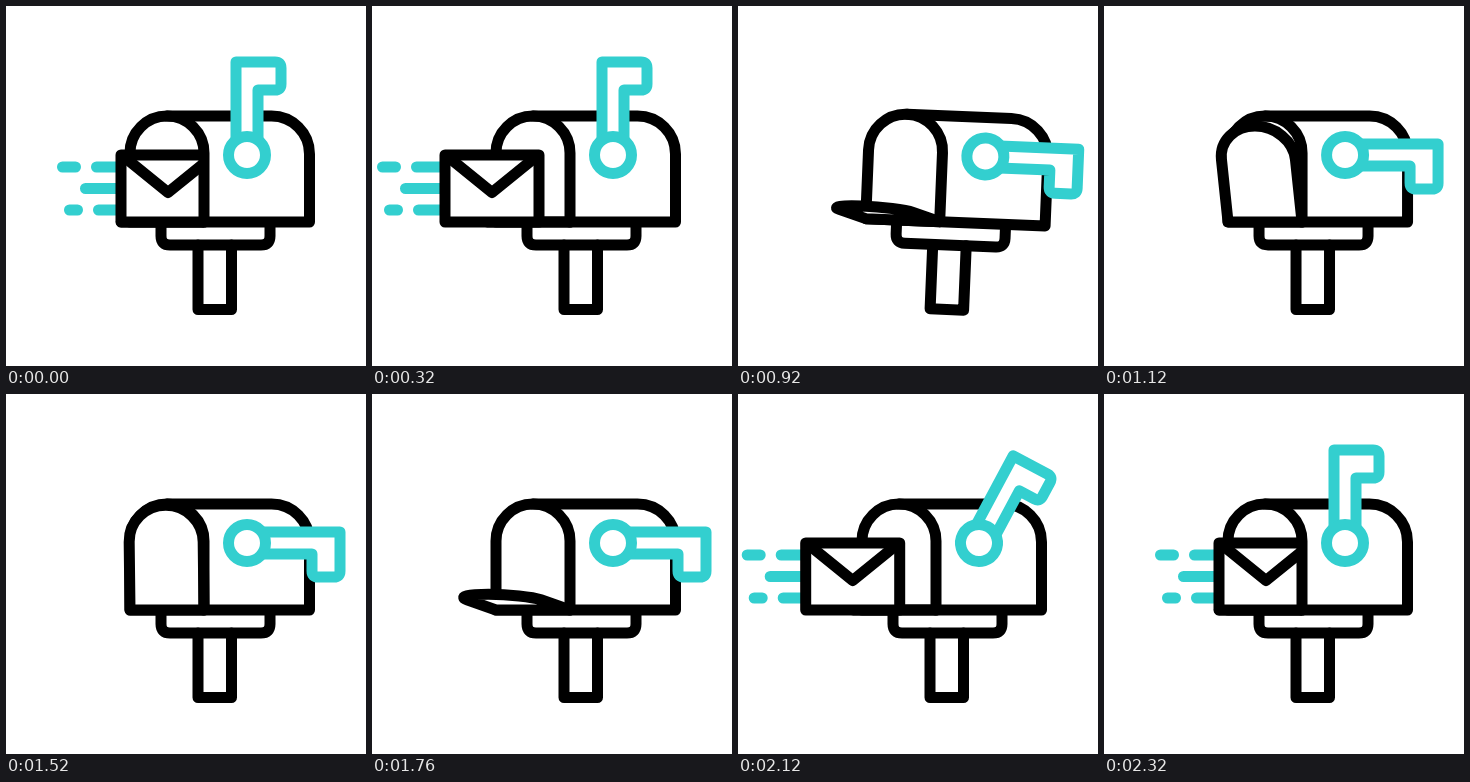
Write an HTML page with a canvas that moves like this. It is 360 px wide and 360 px high and loops after 2400 ms.

```html
<!DOCTYPE html>
<html lang="en">
<head>
<meta charset="utf-8">
<title>Mailbox</title>
<style>
  html, body { margin: 0; width: 100%; height: 100%; overflow: hidden; background: #fff; }
  canvas { display: block; width: 360px; height: 360px; }
</style>
</head>
<body>
<canvas id="stage" width="360" height="360"></canvas>
<script>
const ctx = document.getElementById('stage').getContext('2d');
const LOOP = 2400, BLACK = '#000', TEAL = '#33cfcf';
const HINGE = 216, MOUTH_RIGHT = 198;

const outlines = {
  post: new Path2D('M192 239V303.5H225.5V239'),
  tray: new Path2D('M155 216V230Q155 239 164 239H255Q264 239 264 230V216'),
  box: new Path2D('M161 110H265.5A38 38 0 0 1 303.5 148V216H124V147A37 37 0 0 1 161 110Z'),
  arch: new Path2D('M124 216V147A37 37 0 0 1 198 147V216'),
  mouthEdge: new Path2D('M161 110A37 37 0 0 1 198 147V216'),
  envelope: new Path2D('M0 149H94V216H0Z'),
  fold: new Path2D('M2 150L47 186.5L92 150'),
  flag: new Path2D('M-11 -14V-93H28Q34 -93 34 -87V-71Q34 -65 28 -65H11V-14'),
  ring: new Path2D('M18.5 0A18.5 18.5 0 1 1 -18.5 0A18.5 18.5 0 1 1 18.5 0Z'),
  dashes: new Path2D('M5.5 161H18.5M39.5 161H63.5M28.5 182.5H65.5M12.5 204H20.5M41.5 204H64.5')
};

const ramp = (t, from, to) => Math.min(1, Math.max(0, (t - from) / (to - from)));
const ease = (t, from, to) => { const u = ramp(t, from, to); return u * u * (3 - 2 * u); };
const mix = (a, b, p) => a + (b - a) * p;

function draw(path, color = BLACK, filled = false) {
  if (filled) { ctx.fillStyle = '#fff'; ctx.fill(path); }
  ctx.strokeStyle = color;
  ctx.stroke(path);
}

function group(x, y, angle, paint) {
  ctx.save();
  ctx.translate(x, y);
  ctx.rotate(angle * Math.PI / 180);
  paint();
  ctx.restore();
}

// The door folds up from its hinge, leaning left on the way.
function drawDoor(closed) {
  const height = 0.001 + 0.999 * closed ** 1.5;
  const lean = (13 * (1 - closed) + 46 * Math.sin(Math.PI * closed)) / 106;
  const door = new Path2D();
  door.addPath(outlines.arch, new DOMMatrix([1, 0, lean, height, -lean * HINGE, HINGE * (1 - height)]));
  door.closePath();
  draw(door, BLACK, true);
}

function mailPosition(t) {
  if (t < 320) {
    const p = ease(t, 0, 320);
    return { letter: mix(115, 73, p), trail: mix(51, 5, p) };
  }
  if (t < 1600) {
    const p = ((t - 320) / 280) ** 2;
    return { letter: 73 + 91 * p, trail: 5 + 77 * p };
  }
  const letter = mix(-138, 115, ease(t, 1600, 2320));
  return { letter, trail: letter - 64 };
}

function drawMail(t) {
  const { letter, trail } = mailPosition(t);
  ctx.save();
  ctx.beginPath();
  ctx.rect(-400, 0, 400 + MOUTH_RIGHT, 360);
  ctx.clip();
  group(trail, 0, 0, () => draw(outlines.dashes, TEAL));
  group(letter, 0, 0, () => {
    draw(outlines.envelope, BLACK, true);
    draw(outlines.fold);
  });
  ctx.restore();
}

function render(t) {
  const tilt = 4.7 * (ease(t, 500, 700) - ease(t, 700, 1140));
  const flagAngle = 90 * (ease(t, 500, 740) - ease(t, 1912, 2245));
  const closed = ease(t, 800, 1180) - ease(t, 1500, 1900);

  ctx.setTransform(1, 0, 0, 1, 0, 0);
  ctx.fillStyle = '#fff';
  ctx.fillRect(0, 0, 360, 360);
  ctx.lineWidth = 11;
  ctx.lineCap = ctx.lineJoin = 'round';

  group(208.5, 306, tilt, () => {
    ctx.translate(-208.5, -306);
    draw(outlines.post);
    draw(outlines.tray);
    draw(outlines.box, BLACK, true);
    drawDoor(closed);
    drawMail(t);
    draw(outlines.mouthEdge);
    group(241, 149, flagAngle, () => {
      draw(outlines.flag, TEAL, true);
      draw(outlines.ring, TEAL, true);
    });
  });
}

function frame() {
  render(performance.now() % LOOP);
  requestAnimationFrame(frame);
}
frame();
</script>
</body>
</html>
```
